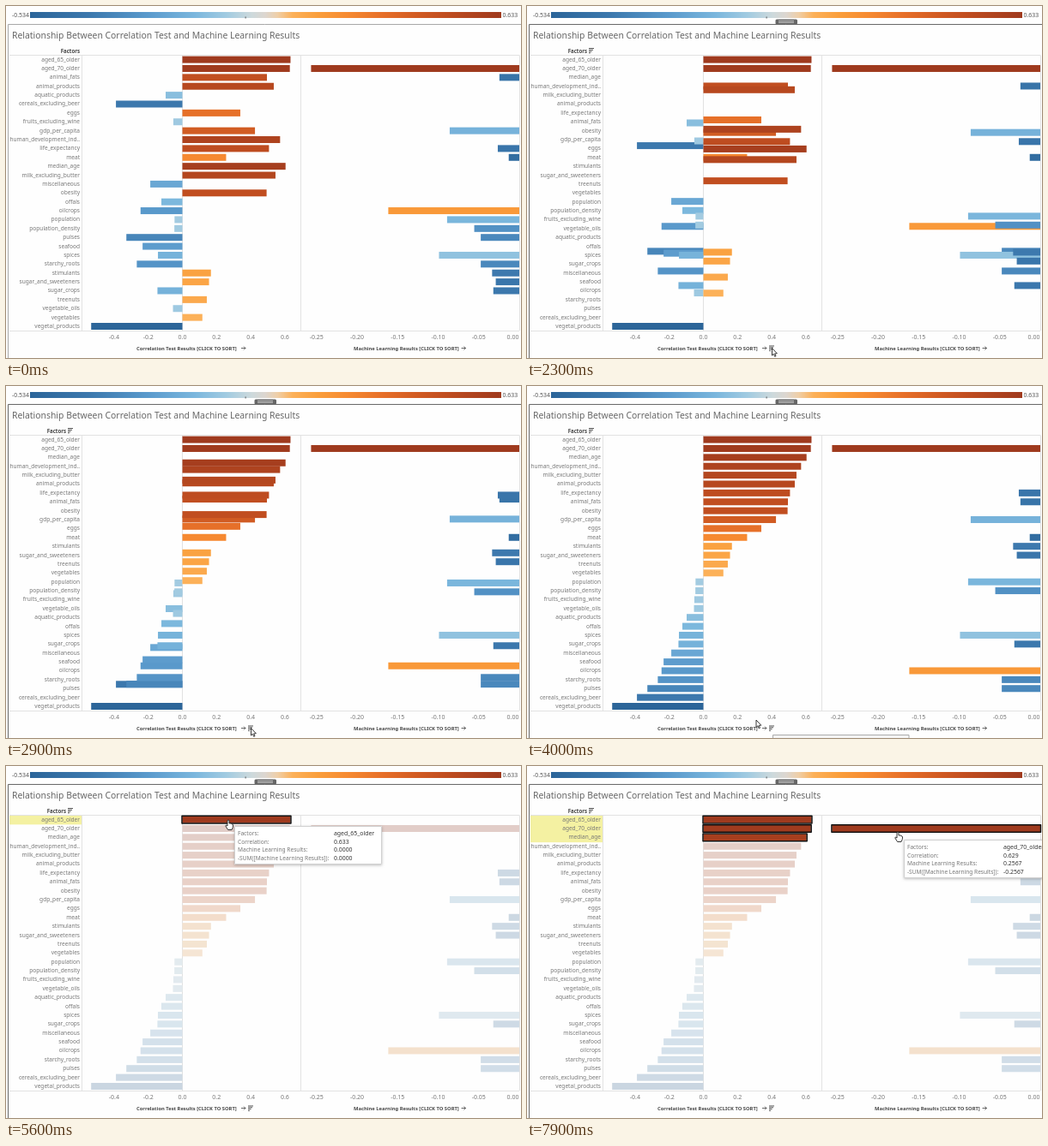
Recreate the animation shown at these times as an HTML page with a canvas. Size 600 by 411 pixels, loop 8 s.

```html
<!DOCTYPE html>
<html lang="en">
<head>
<meta charset="utf-8">
<title>Correlation and machine learning results</title>
<style>
  html, body { margin: 0; width: 100%; height: 100%; overflow: hidden; background: #fff; }
  canvas { display: block; }
</style>
</head>
<body>
<canvas id="stage" width="600" height="411"></canvas>
<script>
const ctx = document.getElementById('stage').getContext('2d');
const FONT = '"Noto Sans", "Open Sans", sans-serif';
const LOOP = 8000, STEP = 100;
const ROW_TOP = 62.6, ROW_PITCH = 10.38, BAR = 8;
const CORR = { zero: 205.5, scale: 199, mid: 0.0495, half: 0.5835 };
const LEARN = { zero: 598, scale: 945, mid: -0.12835, half: -0.12835 };

// name, correlation, machine learning result
const factors = [
  ['aged_65_older', 0.633], ['aged_70_older', 0.629, -0.2567],
  ['animal_fats', 0.495, -0.0245], ['animal_products', 0.535],
  ['aquatic_products', -0.098], ['cereals_excluding_beer', -0.389],
  ['eggs', 0.339], ['fruits_excluding_wine', -0.053],
  ['gdp_per_capita', 0.425, -0.0858], ['human_development_ind..', 0.572],
  ['life_expectancy', 0.507, -0.0265], ['meat', 0.256, -0.013],
  ['median_age', 0.604], ['milk_excluding_butter', 0.545],
  ['miscellaneous', -0.188], ['obesity', 0.493],
  ['offals', -0.123], ['oilcrops', -0.245, -0.1615],
  ['population', -0.046, -0.089], ['population_density', -0.047, -0.0555],
  ['pulses', -0.328, -0.0475], ['seafood', -0.233],
  ['spices', -0.143, -0.099], ['starchy_roots', -0.267, -0.0475],
  ['stimulants', 0.167, -0.0335], ['sugar_and_sweeteners', 0.156, -0.029],
  ['sugar_crops', -0.146, -0.032], ['treenuts', 0.143],
  ['vegetable_oils', -0.055], ['vegetables', 0.117], ['vegetal_products', -0.534]
].map(([name, corr, learn = 0], row) => ({ name, corr, learn, row }));
[...factors].sort((a, b) => b.corr - a.corr).forEach((f, i) => f.rank = i);

// diverging palette over -1..1
const palette = [
  [-1, '#2c6599'], [-0.75, '#3c78ad'], [-0.5, '#5a9acc'], [-0.3, '#7bb7dd'],
  [-0.165, '#a2cbe1'], [-0.06, '#cdd9dc'], [0, '#ddd6cf'], [0.05, '#efcfa8'],
  [0.115, '#fcb159'], [0.22, '#fa9f3c'], [0.35, '#f68a31'], [0.5, '#e66f29'],
  [0.64, '#d25c23'], [0.76, '#c14e20'], [1, '#9f3a1e']
].map(([at, hex]) => [at, [1, 3, 5].map(i => parseInt(hex.slice(i, i + 2), 16))]);

// pointer path: time, x, y
const path = [
  [800, 278, 410], [1200, 283, 401], [1400, 285.5, 399.5], [3900, 285.5, 399.5],
  [4000, 267, 390], [4800, 258, 63], [5700, 258, 63], [6200, 243, 85.5],
  [6600, 243, 85.5], [7050, 325, 152], [7500, 431, 77], [8000, 431, 77]
];

const clamp = v => Math.max(0, Math.min(1, v));
const ease = p => p * p * (3 - 2 * p);
const mix = (a, b, p) => a + (b - a) * p;
const rowY = i => ROW_TOP + i * ROW_PITCH;

function colorAt(u) {
  const i = Math.max(1, palette.findIndex(p => p[0] >= u - 1e-9));
  const [a, ca] = palette[i - 1], [b, cb] = palette[i];
  const p = clamp((u - a) / (b - a));
  return `rgb(${ca.map((c, k) => Math.round(mix(c, cb[k], p)))})`;
}

function rect(x, y, w, h, color) {
  ctx.fillStyle = color;
  ctx.fillRect(x, y, w, h);
}

function line(color, width, ...points) {
  ctx.strokeStyle = color;
  ctx.lineWidth = width;
  ctx.beginPath();
  points.forEach(([x, y]) => ctx.lineTo(x, y));
  ctx.stroke();
}

function text(str, x, y, size, { color = '#777', align = 'left', weight = 400 } = {}) {
  ctx.font = `${weight} ${size}px ${FONT}`;
  ctx.fillStyle = color;
  ctx.textAlign = align;
  ctx.textBaseline = 'alphabetic';
  ctx.fillText(str, x, y + size * 0.35);
}

function sortIcon(x, y) {
  [6, 5, 3.5, 2].forEach((w, i) => rect(x, y + i * 1.8, w, 0.9, '#444'));
}

function axisTitle(str, x, arrowX) {
  text(str, x, 399.5, 5.8, { color: '#444', weight: 600 });
  line('#444', 0.8, [arrowX, 399.5], [arrowX + 5, 399.5]);
  line('#444', 0.8, [arrowX + 3, 397.5], [arrowX + 5, 399.5], [arrowX + 3, 401.5]);
}

function legend() {
  const gradient = ctx.createLinearGradient(28, 0, 577, 0);
  palette.forEach(([at]) => gradient.addColorStop((at + 1) / 2, colorAt(at)));
  rect(28, 7, 549, 7, gradient);
  rect(278.6, 12.5, 1, 2, '#555');
  text('-0.534', 7, 11, 6.9, { color: '#555' });
  text('0.633', 578.5, 11, 6.9, { color: '#555' });
}

function frame(active) {
  const edge = active ? '#686868' : '#a8a8a8';
  line(edge, 1, [600, 21.5], [2.5, 21.5], [2.5, 411]);
  if (!active) return;
  ctx.fillStyle = '#666';
  ctx.beginPath();
  ctx.roundRect(289.5, 15.5, 25.5, 6, 1.5);
  ctx.fill();
  line('#ddd', 0.8, [293, 17.6], [311, 17.6]);
  line('#ddd', 0.8, [293, 19.4], [311, 19.4]);
}

function axes() {
  const rule = '#e2e2e2';
  line(rule, 1, [4, 57.5], [598, 57.5]);
  line(rule, 1, [4, 379.5], [598, 379.5]);
  line(rule, 1, [88.5, 57.5], [88.5, 379]);
  line(rule, 1, [343.5, 57.5], [343.5, 379]);
  line(rule, 1, [205.5, 57.5], [205.5, 379]);
  line(rule, 1, [598.5, 57.5], [598.5, 379]);
  for (let v = -2; v <= 3; v++)
    text((v * 0.2).toFixed(1), CORR.zero + v * 0.2 * CORR.scale, 387, 7, { align: 'center' });
  for (let v = -5; v < 0; v++)
    text((v * 0.05).toFixed(2), LEARN.zero + v * 0.05 * LEARN.scale, 387, 7, { align: 'center' });
  text('0.00', 597.5, 387, 7, { align: 'right' });
  axisTitle('Correlation Test Results [CLICK TO SORT]', 152, 274);
  axisTitle('Machine Learning Results [CLICK TO SORT]', 405, 530.5);
}

function bar(value, axis, y, dimmed, outlined) {
  if (!value) return;
  const end = axis.zero + value * axis.scale;
  const x = Math.min(end, axis.zero), w = Math.abs(end - axis.zero);
  const u = (value - axis.mid) / Math.abs(axis.half) * (axis === LEARN ? -1 : 1);
  if (dimmed) rect(x, y - BAR / 2, w, BAR, '#f2f2f2');
  ctx.globalAlpha = dimmed ? 0.2 : 1;
  rect(x, y - BAR / 2, w, BAR, colorAt(u));
  ctx.globalAlpha = 1;
  if (outlined) {
    ctx.strokeStyle = '#111';
    ctx.lineWidth = 1.5;
    ctx.strokeRect(x - 0.5, y - BAR / 2 - 0.3, w + 1, BAR + 0.6);
  }
}

function tooltip(x, y, width, f) {
  ctx.save();
  ctx.shadowColor = 'rgba(0,0,0,.25)';
  ctx.shadowBlur = 3;
  ctx.shadowOffsetY = 1;
  rect(x, y, width, 45, '#fff');
  ctx.restore();
  ctx.strokeStyle = '#d0d0d0';
  ctx.lineWidth = 1;
  ctx.strokeRect(x + 0.5, y + 0.5, width - 1, 44);
  [
    ['Factors:', f.name],
    ['Correlation:', f.corr.toFixed(3)],
    ['Machine Learning Results:', Math.abs(f.learn).toFixed(4)],
    ['-SUM([Machine Learning Results]):', f.learn.toFixed(4)]
  ].forEach(([label, value], i) => {
    const rowAt = y + 9 + i * 9.4;
    text(label, x + 4, rowAt, 6.6, { color: '#777' });
    text(value, x + 116, rowAt, 6.9, { color: '#333', weight: 500 });
  });
}

function shape(x, y, points, fill, stroke) {
  ctx.beginPath();
  points.forEach(([dx, dy]) => ctx.lineTo(x + dx, y + dy));
  ctx.closePath();
  ctx.fillStyle = fill;
  ctx.fill();
  ctx.strokeStyle = stroke;
  ctx.lineWidth = 0.9;
  ctx.lineJoin = 'round';
  ctx.stroke();
}

function pointer(t) {
  if (t < path[0][0]) return;
  const i = Math.max(1, path.findIndex(k => k[0] >= t));
  const [t0, x0, y0] = path[i - 1], [t1, x1, y1] = path[i];
  const p = ease(clamp((t - t0) / (t1 - t0)));
  const x = mix(x0, x1, p), y = mix(y0, y1, p);
  const hand = (t >= 4700 && t < 6800) || t >= 7500;
  if (hand) {
    shape(x, y, [[0, 0.5], [1, 0], [2, 0.5], [2, 4], [4, 4], [6, 5], [6.5, 6], [6.3, 8.5],
      [5, 11.5], [0.6, 11.5], [-2.2, 7], [-1.6, 6], [0, 7]], '#fff', '#222');
  } else {
    shape(x, y, [[0, 0], [0, 8.5], [1.9, 6.8], [3.2, 9.8], [4.5, 9.2], [3.2, 6.4], [5.8, 6.2]],
      '#fff', '#222');
  }
}

function draw(t) {
  const sorted = t >= 2000;
  const progress = ease(clamp((t - 2000) / 1060));
  const selected = [5400, 5900, 6200].filter(at => t >= at).length;
  const corrHovered = t >= 4900 && t < 5900;
  const learnHovered = t >= 7500;
  const byRank = i => factors.find(f => f.rank === i);

  rect(0, 0, 600, 411, '#fefefe');
  legend();
  frame(t >= 1700);
  text('Relationship Between Correlation Test and Machine Learning Results', 7, 34.4, 10.4,
    { color: '#666' });
  text('Factors', sorted ? 70 : 86, 53, 6.1, { color: '#444', weight: 600, align: 'right' });
  if (sorted) sortIcon(72, 49);
  if (selected) rect(4, 58, 84, selected * ROW_PITCH, '#f4f1a2');
  axes();
  if (t >= 1000) sortIcon(282, 396.5);

  for (const f of factors) {
    text(f.name, 86, rowY(sorted ? f.rank : f.row) - 0.3, 6.55, { align: 'right' });
    const y = mix(rowY(f.row), rowY(f.rank), progress);
    const chosen = f.rank < selected;
    const dimmed = selected > 0 && !chosen;
    bar(f.corr, CORR, y, dimmed, chosen || (corrHovered && f.rank === 0));
    bar(f.learn, LEARN, y, dimmed, learnHovered && f.rank === 1);
  }

  if (t >= 4900 && t < 5800) tooltip(266, 70, 172, byRank(0));
  if (t >= 6200 && t < 6700) tooltip(251, 93, 188, byRank(2));
  if (t >= 7600) tooltip(439, 86, 172, byRank(1));
  if (t >= 3100 && t < 4200) {
    rect(286, 407.5, 159, 4, '#f4f4f4');
    line('#999', 0.8, [286.5, 411], [286.5, 407.5], [445, 407.5], [445, 411]);
    text('Sorted descending by sum of Correlation within Factors', 290, 412.5, 6);
  }
  pointer(t);
}

function tick(now) {
  draw(Math.floor((now % LOOP) / STEP) * STEP);
  requestAnimationFrame(tick);
}
requestAnimationFrame(tick);
</script>
</body>
</html>
```
